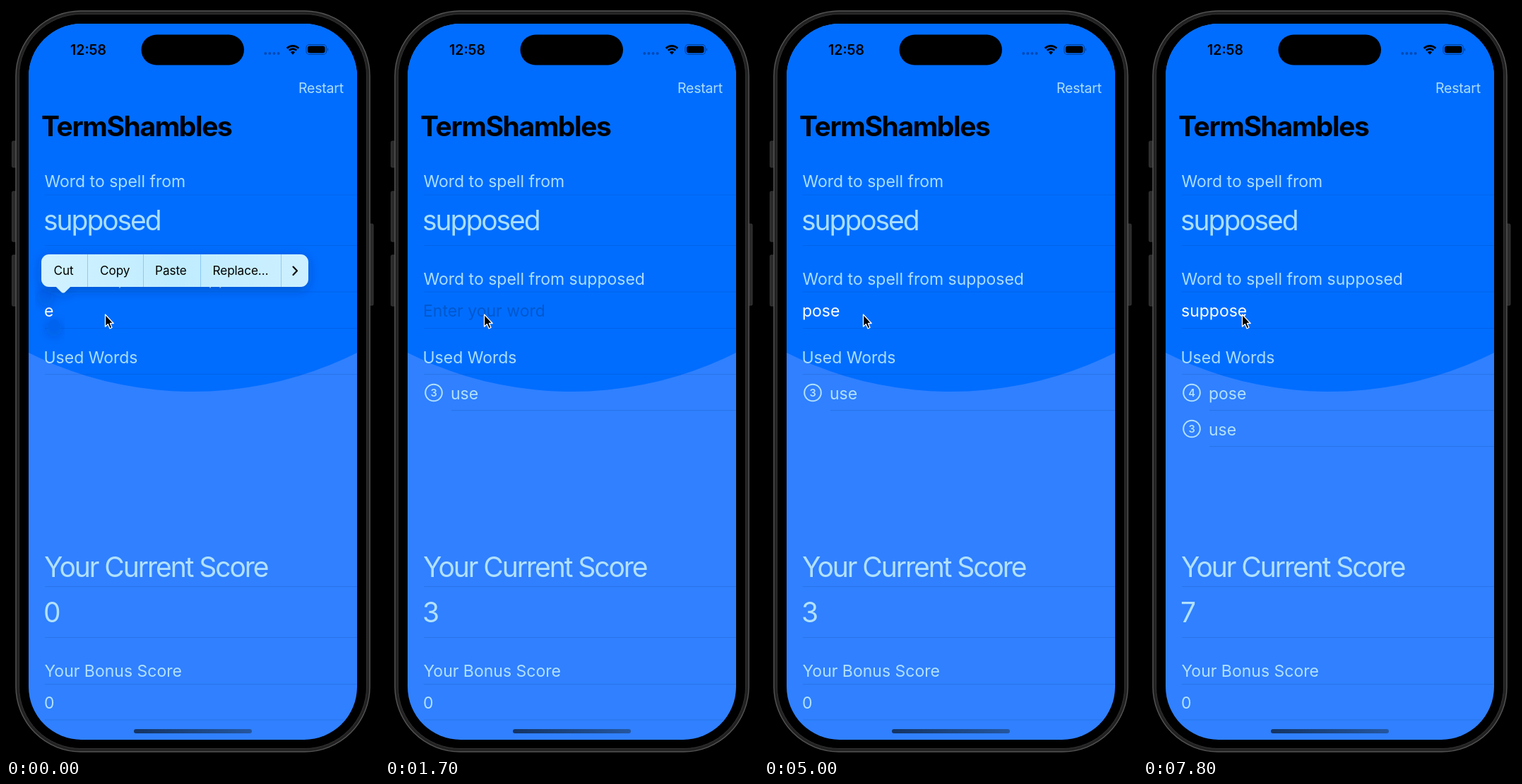
Recreate the animation shown at these times as an HTML page. Size 528 by 1060 pixels, loop 8 s.

```html
<!DOCTYPE html>
<html lang="en">
<head>
<meta charset="utf-8">
<title>TermShambles</title>
<style>
  html, body { margin: 0; width: 100%; height: 100%; overflow: hidden; background: #000; }
  svg { display: block; width: 100%; height: 100%; }
  text { font-family: Inter, Roboto, sans-serif; font-optical-sizing: none; white-space: pre; }
  .pale { fill: rgba(208, 247, 253, .82); }
  .mid { font-size: 23px; }
  .big { font-size: 39px; letter-spacing: -2.05px; }
  .title { font-size: 39px; font-weight: 700; letter-spacing: -1.4px; }
  .bar { font-size: 19.5px; letter-spacing: -.2px; }
  .clock { font-size: 19.5px; font-weight: 600; }
  .item { font-size: 17.2px; letter-spacing: -.1px; }
  .badge { font-size: 14.5px; font-weight: 600; text-anchor: middle; }
  .ring { fill: none; stroke: rgba(208, 247, 253, .82); stroke-width: 2; }
  .rule { stroke: rgba(0, 40, 110, .15); stroke-width: 1.2; }
  .typed { fill: #fff; }
  .hint { fill: #0058cc; }
</style>
</head>
<body>
<svg viewBox="0 0 528 1060">
  <defs>
    <clipPath id="screen"><rect x="32" y="25" width="465" height="1012" rx="75"/></clipPath>
    <linearGradient id="home">
      <stop stop-color="#143464"/><stop offset="1" stop-color="#2456a0"/>
    </linearGradient>
    <linearGradient id="glass">
      <stop stop-color="#d2f2ff"/><stop offset=".5" stop-color="#bfecff"/><stop offset="1" stop-color="#cdf0ff"/>
    </linearGradient>
    <filter id="shade" x="-20%" y="-50%" width="140%" height="220%">
      <feDropShadow dx="0" dy="4" stdDeviation="8" flood-color="#002a70" flood-opacity=".35"/>
    </filter>
  </defs>

  <!-- phone body -->
  <g fill="#2a2a2a" stroke="#3c3c3c" stroke-width=".8">
    <rect x="8.5" y="191" width="8" height="37" rx="1.5"/>
    <rect x="8.5" y="262" width="8" height="71" rx="1.5"/>
    <rect x="8.5" y="352" width="8" height="72" rx="1.5"/>
    <rect x="512" y="308" width="8" height="115" rx="1.5"/>
  </g>
  <rect x="14" y="7" width="501" height="1047" rx="92" fill="#222" stroke="#555" stroke-width="1.4"/>
  <rect x="18.5" y="11.5" width="492" height="1038" rx="87.5" stroke="#333" stroke-width="1"/>

  <g clip-path="url(#screen)">
    <rect x="31" y="24" width="467" height="1014" fill="#3080ff"/>
    <circle cx="264.3" cy="26" r="519" fill="#006dff"/>
    <g id="rules"></g>
    <g id="labels" class="pale"></g>
    <text class="title" x="50" y="183.5">TermShambles</text>
    <g id="rows"></g>
    <g id="scores" class="pale big"></g>
    <text id="field" class="mid" x="54" y="439"></text>
    <rect x="181" y="1022" width="167" height="6" rx="3" fill="url(#home)"/>
  </g>

  <!-- status bar -->
  <rect x="191.5" y="40.5" width="145.5" height="43" rx="21.5"/>
  <text class="clock" x="91" y="69">12:58</text>
  <g fill="#003f9c" fill-opacity=".75">
    <circle cx="367.3" cy="67" r="2"/><circle cx="373.4" cy="67" r="2"/>
    <circle cx="379.5" cy="67" r="2"/><circle cx="385.6" cy="67" r="2"/>
  </g>
  <path d="M397.7 59.7A11.8 11.8 0 0 1 414.3 59.7M400.8 62.8A7.3 7.3 0 0 1 411.2 62.8" fill="none" stroke="#000" stroke-width="2.7"/>
  <path d="M406 68.8L402.9 65.2A4.4 4.4 0 0 1 409.1 65.2Z"/>
  <rect x="425" y="54.5" width="28.5" height="14" rx="4.5" fill="none" stroke="#000" stroke-opacity=".42" stroke-width="1.2"/>
  <rect x="427" y="56.5" width="24.5" height="10" rx="3"/>
  <path d="M455 59.3q2 2.2 0 4.6z" fill-opacity=".5"/>

  <!-- text selection and edit menu -->
  <g id="handles" fill="#0064f0" filter="url(#shade)">
    <circle cx="56" cy="408" r="9"/><circle cx="68" cy="452" r="9"/>
  </g>
  <g id="menu">
    <path filter="url(#shade)" fill="url(#glass)" d="M61 351H417a11 11 0 0 1 11 11V386a11 11 0 0 1 -11 11H91L83.5 404.5Q81 406.5 78.5 404.5L71 397H61a11 11 0 0 1 -11 -11V362a11 11 0 0 1 11 -11Z"/>
    <rect id="more" x="390" y="351" width="38" height="46" rx="8" fill="#e4f6ff"/>
    <path d="M115.5 351V397M194.5 351V397M275.5 351V397M389.5 351V397" stroke="#4c9be8" stroke-opacity=".45"/>
    <g id="items"></g>
    <path d="M406.5 368.5L412 374.3L406.5 380" fill="none" stroke="#000" stroke-width="2.1" stroke-linecap="round" stroke-linejoin="round"/>
  </g>

  <path d="M140.5 436V453.2L144.4 449.6L147 455.8L150 454.5L147.4 448.5H152.2Z" stroke="#fff" stroke-width="1.3" stroke-linejoin="round"/>
</svg>

<script>
const LOOP = 8000;
const $ = id => document.getElementById(id);

function add(parent, tag, attrs, content = "") {
  const el = document.createElementNS("http://www.w3.org/2000/svg", tag);
  for (const key in attrs) el.setAttribute(key, attrs[key]);
  el.textContent = content;
  return parent.appendChild(el);
}

const rule = (parent, x, y) => add(parent, "line", { class: "rule", x1: x, x2: 497, y1: y, y2: y });

[267, 338.5, 404, 455.5, 520.5, 820.5, 892.5, 958.5, 1009].forEach(y => rule($("rules"), 55, y));

[
  ["Restart", "bar", 414, 123],
  ["Word to spell from", "mid", 54.5, 255.5],
  ["supposed", "big", 53, 317],
  ["Word to spell from supposed", "mid", 54.5, 393.5],
  ["Used Words", "mid", 53.5, 504.5],
  ["Your Current Score", "big", 54, 807],
  ["Your Bonus Score", "mid", 54.5, 947.5],
  ["0", "mid", 54, 992.5]
].forEach(([label, style, x, y]) => add($("labels"), "text", { class: style, x, y }, label));

[["Cut", 67.5], ["Copy", 133], ["Paste", 211], ["Replace…", 292.5]]
  .forEach(([label, x]) => add($("items"), "text", { class: "item", x, y: 380.3 }, label));

function makeRow(word) {
  const row = add($("rows"), "g", {});
  add(row, "circle", { class: "ring", cx: 69, cy: 546.5, r: 11.8 });
  add(row, "text", { class: "badge pale", x: 69, y: 551.8 }, word.length);
  add(row, "text", { class: "mid pale", x: 93, y: 556 }, word);
  rule(row, 94, 571.5);
  return row;
}

const useRow = makeRow("use");
const poseRow = makeRow("pose");
const scores = ["0", "3", "7"].map(n => add($("scores"), "text", { x: 53, y: 871 }, n));

// [start ms, field text]; an empty field shows the hint
const typing = [
  [0, "e"], [100, "us"], [300, "use"], [1050, ""],
  [4000, "p"], [4100, "po"], [4200, "pos"], [4500, "pose"], [5050, ""],
  [6900, "s"], [7000, "su"], [7200, "sup"], [7300, "supp"],
  [7500, "suppo"], [7600, "suppos"], [7800, "suppose"]
];

function ease(t, start, end) {
  const p = Math.min(1, Math.max(0, (t - start) / (end - start)));
  return p * p * (3 - 2 * p);
}

const fade = (el, value) => el.setAttribute("opacity", value);

function draw(t) {
  const word = typing.filter(step => step[0] <= t).pop()[1];
  $("field").textContent = word || "Enter your word";
  $("field").setAttribute("class", word ? "mid typed" : "mid hint");

  const shrunk = t >= 100;
  fade($("handles"), shrunk ? 0 : 1);
  fade($("menu"), t >= 200 ? 0 : shrunk ? .45 : 1);
  fade($("more"), shrunk ? 1 : 0);
  $("menu").setAttribute("transform", `translate(81 406) scale(${shrunk ? .5 : 1}) translate(-81 -406)`);

  const first = ease(t, 1050, 1500);
  const second = ease(t, 5050, 5450);
  fade(useRow, first);
  useRow.setAttribute("transform", `translate(0 ${51 * second})`);
  fade(poseRow, second);
  fade(scores[0], 1 - first);
  fade(scores[1], first * (1 - second));
  fade(scores[2], second);
}

const begin = performance.now();
function tick() {
  draw(Math.max(0, performance.now() - begin) % LOOP);
  requestAnimationFrame(tick);
}
draw(0);
requestAnimationFrame(tick);
</script>
</body>
</html>
```
